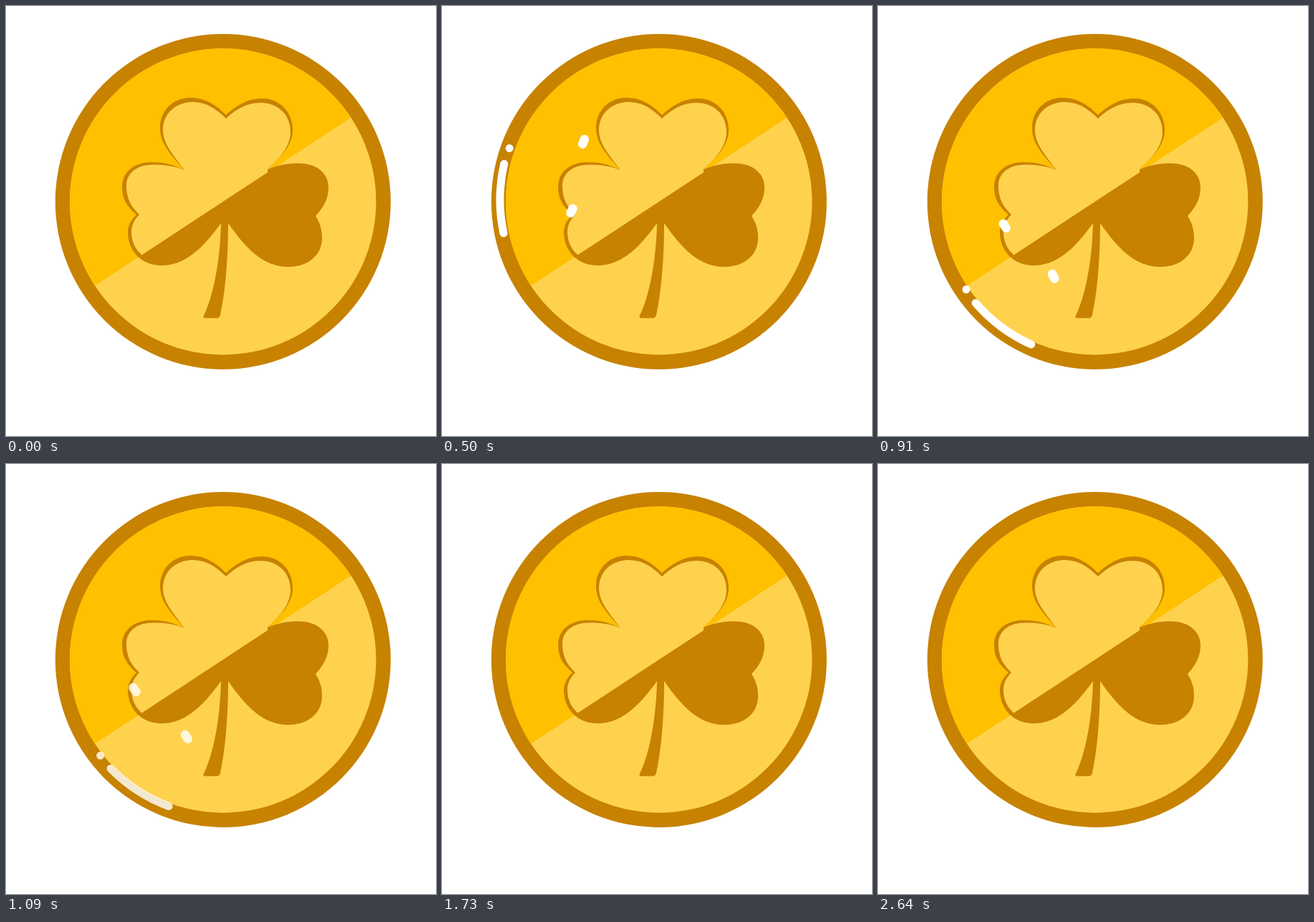
Animation, 600 px wide and 600 px high, one loop 2.69 s. Source, as an HTML page:

```html
<!DOCTYPE html>
<html lang="en">
<head>
<meta charset="utf-8">
<title>Clover coin</title>
<style>
  html, body { margin: 0; width: 100%; height: 100%; overflow: hidden; background: #fff; }
  svg { display: block; width: 100%; height: 100%; }
</style>
</head>
<body>
<svg viewBox="0 0 600 600">
  <defs>
    <clipPath id="face"><circle cx="302.7" cy="273" r="213.7"/></clipPath>
    <clipPath id="upper"><path d="M0 0H600V78L481 156L123 391L0 472Z"/></clipPath>
  </defs>
  <circle cx="302.8" cy="273" r="234" fill="#c78200"/>
  <g clip-path="url(#face)">
    <rect width="600" height="600" fill="#ffd24d"/>
    <rect width="600" height="600" fill="#ffc000" clip-path="url(#upper)"/>
  </g>
  <path fill="#c78200" d="M249 229
    C231 208 215 193 215 170 C215 146 233 128 257 128 C278 128 293 138 307 152
    C321 139 337 129 357 129 C382 129 400 148 400 173 C400 194 384 210 365 228
    C379 222 393 219.5 408 219.5 C432 219.5 450 232 450 253 C450 270 442 282 432 293
    C438 302 441 312 441 324 C441 348 421 364 394 364 C358 364 334 337 310 303
    C310 345 307 395 299 431 Q298 435.500 294 435.500 L277 435.500 Q275 435 275.500 433
    C291 401 299 350 300 303
    C278 333 253 362 217 362 C189 362 170 342 170 315 C170 306 175 298 182 291
    C169 280 162 269 162 253 C162 231 179 218 203 218 C219 218 234 221 249 229Z"/>
  <path fill="#ffd24d" clip-path="url(#upper)" d="M249 229
    C235 209 219 194 219 173 C219 150 237 134 260 134 C280 134 294 144 307 157
    C320 145 335 135 355 135 C380 135 397 152 397 176 C397 196 382 212 365 228
    L365 240 L189 352 L189 347
    C180 339 175 328 175 315 C175 306 179 298 186 291
    C174 280 168 268 168 251 C168 233 183 221.500 205 221.500 C221 221.500 235 223 249 229Z"/>
  <g id="shine" fill="none" stroke="#fff" stroke-linecap="round" opacity="0">
    <path d="M84.500 227A222.300 222.300 0 0 1 123.500 138.500" stroke-width="11"/>
    <circle cx="139" cy="121.500" r="5.500" fill="#fff" stroke="none"/>
    <path d="M235 156.500L240 151.500M181.500 238.300L186.700 233.700" stroke-width="12.500"/>
  </g>
</svg>
<script>
  const LOOP = 2690, FPS = 22;
  const shine = document.getElementById('shine');
  const ramp = (t, from, to) => Math.min(1, Math.max(0, (t - from) / (to - from)));
  const ease = x => (1 - Math.cos(Math.PI * x)) / 2;

  function draw(ms) {
    const t = Math.floor((ms % LOOP) * FPS / 1000 + 1e-6) * 1000 / FPS;
    const angle = 9.2 - 90 * ease(ramp(t, 134, 1025));
    const alpha = ramp(t, 45, 225) * (1 - ramp(t, 1025, 1380));
    shine.setAttribute('transform', `rotate(${angle.toFixed(3)} 303 268.5)`);
    shine.setAttribute('opacity', alpha.toFixed(3));
  }

  const start = performance.now();
  function tick() {
    draw(performance.now() - start);
    requestAnimationFrame(tick);
  }
  tick();
</script>
</body>
</html>
```
